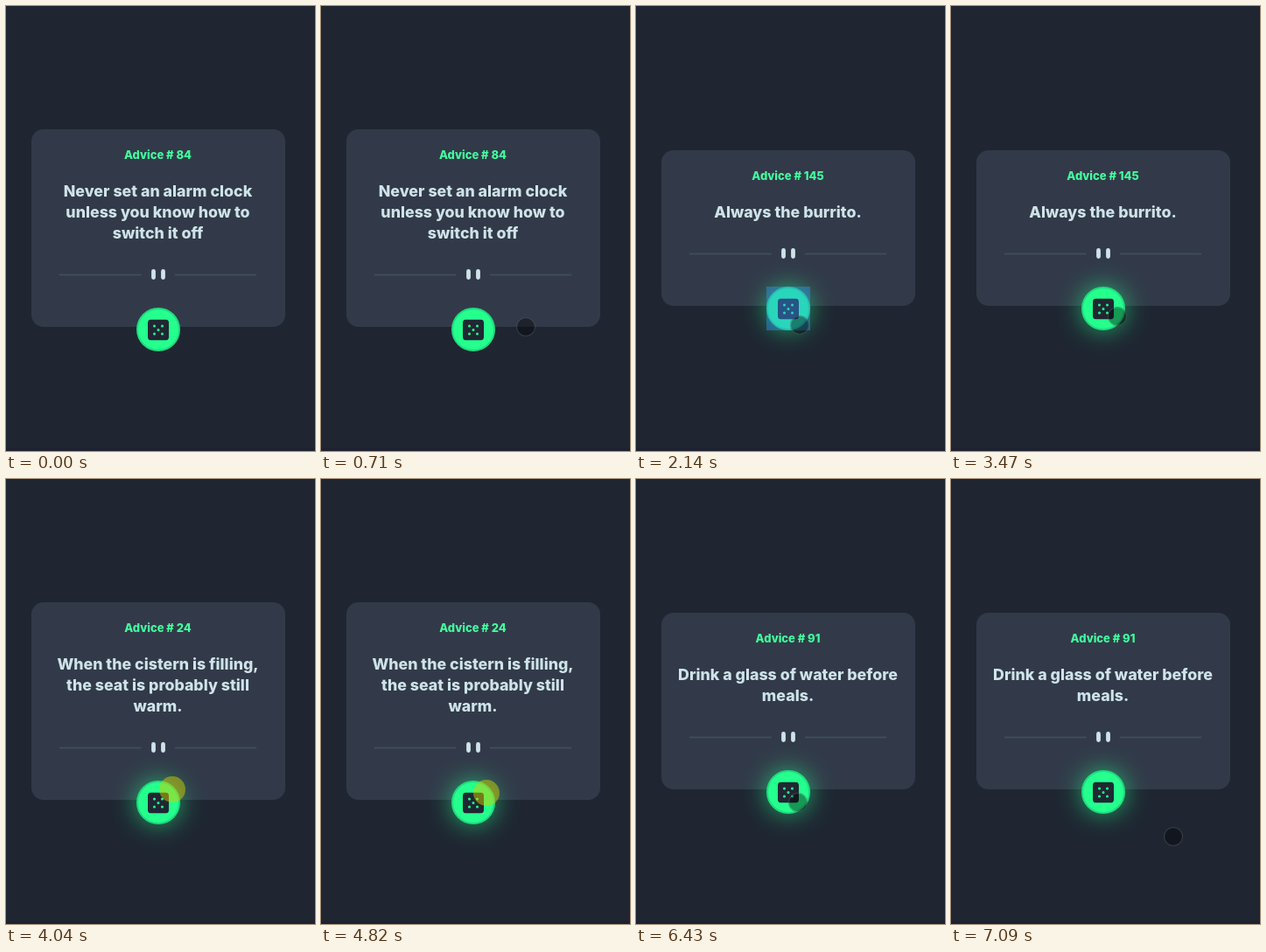
Recreate the animation shown at these times as an HTML page. Size 353 px wide and 509 px high, loop 7.52 s.

```html
<!DOCTYPE html>
<html lang="en">
<head>
<meta charset="utf-8">
<title>Advice generator</title>
<style>
  html, body { margin: 0; width: 100%; height: 100%; overflow: hidden; }
  body {
    position: relative;
    background: linear-gradient(#1f2632 505px, #1e2130 505px);
    font-family: Inter, sans-serif;
    text-align: center;
  }
  .card, .card > *, .dice, .tap, .cursor { position: absolute; }
  .card { left: 29px; width: 290px; border-radius: 14px; background: #323a49; }
  h1, p { left: 0; width: 289px; margin: 0; font-weight: 800; }
  h1 { top: 19px; font-size: 13px; line-height: 20px; color: #42ff9e; }
  p { top: 59px; font-size: 17.8px; line-height: 24px; color: #cee3e9; white-space: pre; }
  .divider { left: 32px; bottom: 54px; width: 225px; height: 12px; }
  .button {
    left: 120px; bottom: -28px; width: 50px; height: 50px; box-sizing: border-box;
    border: 2px solid #1fdc7e; border-radius: 50%; background: #24ff8e;
  }
  .dice { left: 11px; top: 11px; width: 24px; height: 24px; transform: translateY(.5px); }
  .tap { left: -2px; top: -2px; width: 50px; height: 50px; background: #39f6; }
  .cursor {
    width: 22px; height: 22px; box-sizing: border-box; border-radius: 50%;
    transform: translate(-50%, -50%);
    border: 1.5px solid rgba(75, 80, 85, .5); background: rgba(0, 0, 0, .4);
    background-clip: padding-box;
  }
  .cursor.pressed { width: 30px; height: 30px; border: 0; background: rgba(208, 203, 0, .5); }
</style>
</head>
<body>
<div class="card">
  <h1></h1>
  <p></p>
  <svg class="divider" viewBox="0 0 225 12">
    <path stroke="#414f61" stroke-width="1.6" d="M0 6.5h93.5M132 6.5h93"/>
    <path stroke="#cee3e9" stroke-width="4.8" stroke-linecap="round" d="M107.5 2.4v7.2M118.5 2.4v7.2"/>
  </svg>
  <div class="button">
    <svg class="dice" viewBox="0 0 24 24">
      <rect width="24" height="24" rx="4" fill="#202733"/>
      <path d="M7.5 7.5h0M16.5 7.5h0M12 12h0M7.5 16.5h0M16.5 16.5h0" stroke="#24ff8e" stroke-width="3" stroke-linecap="round"/>
    </svg>
    <div class="tap"></div>
  </div>
</div>
<div class="cursor"></div>
<script>
const LOOP = 7520, STEP = 70, PRESS = 120, RELEASE = 210;
const [card, title, quote, button, tap, cursor] =
  ['.card', 'h1', 'p', '.button', '.tap', '.cursor'].map(s => document.querySelector(s));

const advice = [
  { at: 0, id: 84, text: 'Never set an alarm clock\nunless you know how to\nswitch it off' },
  { at: 1710, id: 145, text: 'Always the burrito.' },
  { at: 3540, id: 24, text: 'When the cistern is filling,\nthe seat is probably still\nwarm.' },
  { at: 6400, id: 91, text: 'Drink a glass of water before\nmeals.' },
];

const entry = { at: 420, x: 328, y: 406 };
const moves = [
  { at: 420, lasts: 420, x: 187, y: 365 },
  { at: 2640, lasts: 350, x: 189.5, y: 354.5 },
  { at: 4400, lasts: 140, x: 189, y: 359 },
  { at: 5340, lasts: 70, x: 185, y: 370 },
  { at: 6460, lasts: 630, x: 253.5, y: 408.5 },
];
const presses = [1080, 2010, 3260, 3970, 4820, 6110];

const clamp = v => Math.min(1, Math.max(0, v));

// The pointer moves in visible steps, sideways evenly and vertically easing out.
function pointerAt(t) {
  let { x, y } = entry;
  for (const move of moves) {
    const progress = clamp(Math.floor((t - move.at) / STEP) * STEP / move.lasts);
    x += (move.x - x) * progress;
    y += (move.y - y) * (1 - (1 - progress) ** 3);
  }
  return { x, y };
}

let shown;
function showAdvice(item) {
  if (item === shown) return;
  shown = item;
  title.textContent = `Advice # ${item.id}`;
  quote.textContent = item.text;
  const height = 154 + 24 * item.text.split('\n').length;
  card.style.height = `${height}px`;
  card.style.top = `${254 - height / 2}px`;
}

function render(t) {
  showAdvice(advice.findLast(item => t >= item.at));

  const sincePress = t - presses.findLast(at => t >= at);
  cursor.classList.toggle('pressed', sincePress < PRESS);
  tap.hidden = !(sincePress >= PRESS && sincePress < RELEASE);

  const glow = clamp((t - presses[0] - PRESS) / 240);
  button.style.boxShadow = `0 0 28px rgba(36, 255, 142, ${0.62 * glow})`;

  const { x, y } = pointerAt(t);
  cursor.style.left = `${x}px`;
  cursor.style.top = `${y}px`;
  cursor.hidden = t < entry.at;
}

const began = performance.now();
function tick() {
  render((performance.now() - began) % LOOP);
  requestAnimationFrame(tick);
}
tick();
</script>
</body>
</html>
```
